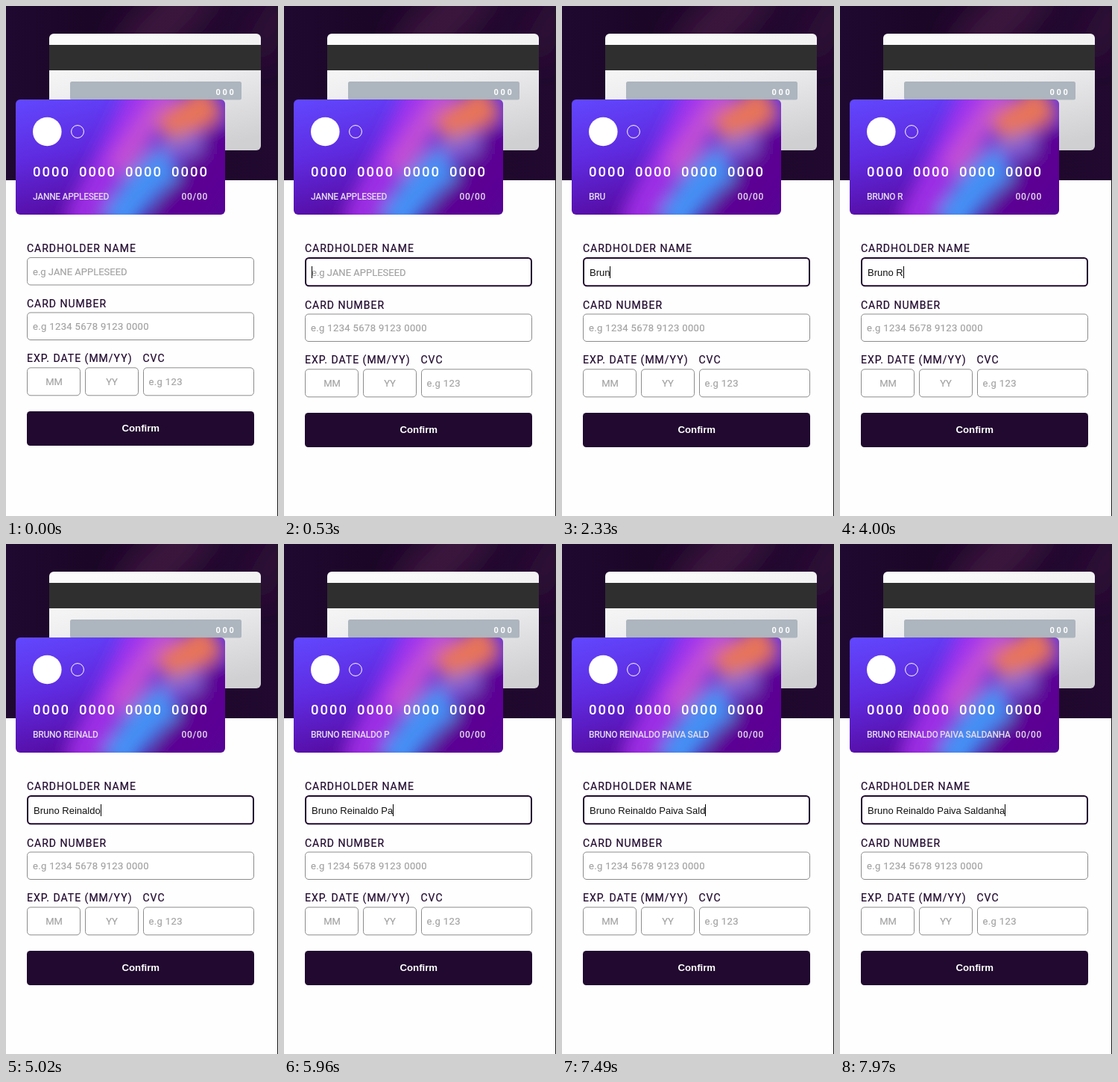
Recreate the animation shown at these times as an HTML page. Size 365x682 px, loop 8000 ms.

```html
<!DOCTYPE html>
<html lang="en">
<head>
<meta charset="utf-8">
<title>Card form</title>
<style>
  html, body { margin: 0; width: 100%; height: 100%; overflow: hidden; background: #fefefe; }
  svg { display: block; width: 100%; height: 100%; }
  text { font-family: Roboto, Inter, sans-serif; font-weight: 500; }
  .label { font-size: 14px; font-weight: 400; letter-spacing: 1px; fill: #21092f; stroke: #21092f; stroke-width: .2px; }
  .hint { font-size: 13px; font-weight: 400; fill: #a3a3a3; stroke: #a3a3a3; stroke-width: .2px; }
  .digits { letter-spacing: .37px; }
  .field { fill: #fff; stroke: #8c8c8c; stroke-width: 1px; }
  .focus { stroke: #21092f; stroke-width: 2px; }
  .small { font-size: 12px; letter-spacing: -.3px; fill: #e3dcea; }
  #typed { font: 13px "Liberation Sans", Arial, sans-serif; fill: #111; }
  .confirm { font: bold 13.2px "Liberation Sans", Arial, sans-serif; fill: #fff; }
</style>
</head>
<body>
<svg viewBox="0 0 365 682" preserveAspectRatio="none">
  <defs>
    <linearGradient id="night" x1="0" y1="0" x2="1" y2="0">
      <stop offset="0" stop-color="#200930"/>
      <stop offset=".3" stop-color="#1b0627"/>
      <stop offset="1" stop-color="#21092f"/>
    </linearGradient>
    <linearGradient id="silver" x1=".3" y1="0" x2=".7" y2="1">
      <stop offset="0" stop-color="#fbfbfb"/>
      <stop offset=".45" stop-color="#ececee"/>
      <stop offset="1" stop-color="#d0d0d3"/>
    </linearGradient>
    <linearGradient id="violet" x1="0" y1="0" x2=".45" y2="1">
      <stop offset="0" stop-color="#6148ff"/>
      <stop offset=".45" stop-color="#5f2be0"/>
      <stop offset="1" stop-color="#540596"/>
    </linearGradient>
    <filter id="soft" filterUnits="userSpaceOnUse" x="-60" y="-60" width="480" height="420">
      <feGaussianBlur stdDeviation="11"/>
    </filter>
    <filter id="haze" filterUnits="userSpaceOnUse" x="-80" y="-80" width="540" height="420">
      <feGaussianBlur stdDeviation="20"/>
    </filter>
    <clipPath id="head"><rect width="364" height="233"/></clipPath>
    <clipPath id="face"><rect x="13" y="125" width="281" height="154" rx="6"/></clipPath>
  </defs>

  <rect width="365" height="682" fill="#fefefe"/>
  <g clip-path="url(#head)">
    <rect width="364" height="233" fill="url(#night)"/>
    <g filter="url(#haze)" fill="none" stroke="#4a1747">
      <path d="M265 -30L165 70" stroke-width="65" opacity=".7"/>
      <path d="M385 -20L330 70" stroke-width="40" opacity=".4"/>
    </g>
  </g>

  <rect x="58" y="37" width="284" height="156" rx="6" fill="url(#silver)"/>
  <rect x="58" y="52" width="284" height="34" fill="#2f2f2f"/>
  <rect x="86" y="101" width="230" height="24.5" rx="2.5" fill="#adb5be"/>
  <text x="281.5" y="118.5" font-size="11" letter-spacing="2.7" fill="#fff" style="font-weight:700">000</text>

  <g clip-path="url(#face)">
    <rect x="13" y="125" width="281" height="154" fill="url(#violet)"/>
    <g filter="url(#soft)" fill="none">
      <path d="M310 175L220 300" stroke="#5c0494" stroke-width="70"/>
      <path d="M190 105Q160 175 95 295" stroke="#a832ee" stroke-width="46" opacity=".85"/>
      <path d="M222 110L148 220" stroke="#cf55d0" stroke-width="34" opacity=".8"/>
      <path d="M280 125L213 172" stroke="#e87558" stroke-width="48"/>
      <path d="M262 182Q205 185 168 240" stroke="#8a70d8" stroke-width="32" opacity=".75"/>
      <path d="M222 208Q185 230 145 295" stroke="#4590f4" stroke-width="46"/>
    </g>
  </g>
  <circle cx="55.3" cy="168" r="19.3" fill="#fff"/>
  <circle cx="96" cy="168" r="8.4" fill="none" stroke="#fff"/>
  <text x="36" y="228.3" font-size="18.5" letter-spacing="2" word-spacing="5.3" fill="#fff">0000 0000 0000 0000</text>
  <text id="holder" class="small" x="36" y="259"></text>
  <text class="small" x="235.5" y="259" style="letter-spacing:.7px">00/00</text>

  <text class="label" x="28" y="329">CARDHOLDER NAME</text>
  <rect id="nameBox" class="field" x="28.5" y="336.5" width="304" height="36.5" rx="4.5"/>
  <text id="nameHint" class="hint" x="36" y="360">e.g JANE APPLESEED</text>
  <text id="typed" x="37" y="361"></text>
  <rect id="caret" y="348" width="1" height="16" fill="#000"/>

  <g id="rest">
    <text class="label" x="28" y="403">CARD NUMBER</text>
    <rect class="field" x="28.5" y="410" width="304" height="36.5" rx="4.5"/>
    <text class="hint digits" x="36" y="433">e.g 1234 5678 9123 0000</text>
    <text class="label" x="28" y="476">EXP. DATE (MM/YY)</text>
    <text class="label" x="183.5" y="476">CVC</text>
    <rect class="field" x="28.5" y="483.8" width="71" height="37" rx="4.5"/>
    <rect class="field" x="106.5" y="483.8" width="71" height="37" rx="4.5"/>
    <rect class="field" x="184.5" y="483.8" width="148" height="37" rx="4.5"/>
    <text class="hint" x="64.5" y="507" text-anchor="middle">MM</text>
    <text class="hint" x="142" y="507" text-anchor="middle">YY</text>
    <text class="hint digits" x="191.5" y="507">e.g 123</text>
    <rect x="28" y="542" width="305" height="46" rx="4.5" fill="#21092f"/>
    <text class="confirm" x="180.8" y="569" text-anchor="middle">Confirm</text>
  </g>
  <rect x="364" width="1" height="682" fill="#1c1c1c"/>
</svg>
<script>
const LOOP = 8000, FOCUS = 530, CLEAR = 1000;
const NAME = "Bruno Reinaldo Paiva Saldanha";
// When each letter appears in the field, and when the card catches up.
const keyTimes = [
  1200, 1670, 1870, 2330, 2560, 2660, 2990, 4270, 4360, 4450, 4680, 4890, 4950, 5020, 5160,
  5430, 5890, 6080, 6170, 6270, 6360, 6690, 7220, 7360, 7420, 7560, 7700, 7840, 7900];
const cardTimes = [
  1470, 1770, 2010, 2460, 2660, 2990, 3140, 4360, 4450, 4540, 4820, 4950, 5020, 5090, 5430,
  5690, 5980, 6170, 6270, 6360, 6560, 6760, 7290, 7420, 7490, 7700, 7770, 7900, 7970];
const caretOff = [[0, FOCUS], [1000, 1200], [3540, 4000]];

const $ = id => document.getElementById(id);
const nameBox = $("nameBox"), nameHint = $("nameHint"), typed = $("typed");
const caret = $("caret"), holder = $("holder"), rest = $("rest");

function set(el, attrs) {
  for (const key in attrs) el.setAttribute(key, attrs[key]);
}

function nameAt(times, t) {
  const count = times.filter(time => time <= t).length;
  return NAME.slice(0, count).replace(/ /g, "\u00a0");
}

function draw(t) {
  const focused = t >= FOCUS;
  const value = nameAt(keyTimes, t);
  set(nameBox, focused
    ? { class: "field focus", x: 29, y: 337, width: 303, height: 37.3 }
    : { class: "field", x: 28.5, y: 336.5, width: 304, height: 36.5 });
  set(nameHint, { x: focused ? 37 : 36, y: focused ? 361 : 360, visibility: value ? "hidden" : "visible" });
  set(rest, { transform: `translate(0 ${focused ? 2 : 0})` });

  typed.textContent = value;
  holder.textContent = t < CLEAR ? "JANNE APPLESEED" : nameAt(cardTimes, t).toUpperCase();

  const width = value ? typed.getComputedTextLength() : 0;
  const hidden = caretOff.some(([from, to]) => t >= from && t < to);
  set(caret, { x: Math.round(37 + width), visibility: hidden ? "hidden" : "visible" });
}

const start = performance.now();
function tick() {
  draw((performance.now() - start) % LOOP);
  requestAnimationFrame(tick);
}
draw(0);
requestAnimationFrame(tick);
</script>
</body>
</html>
```
